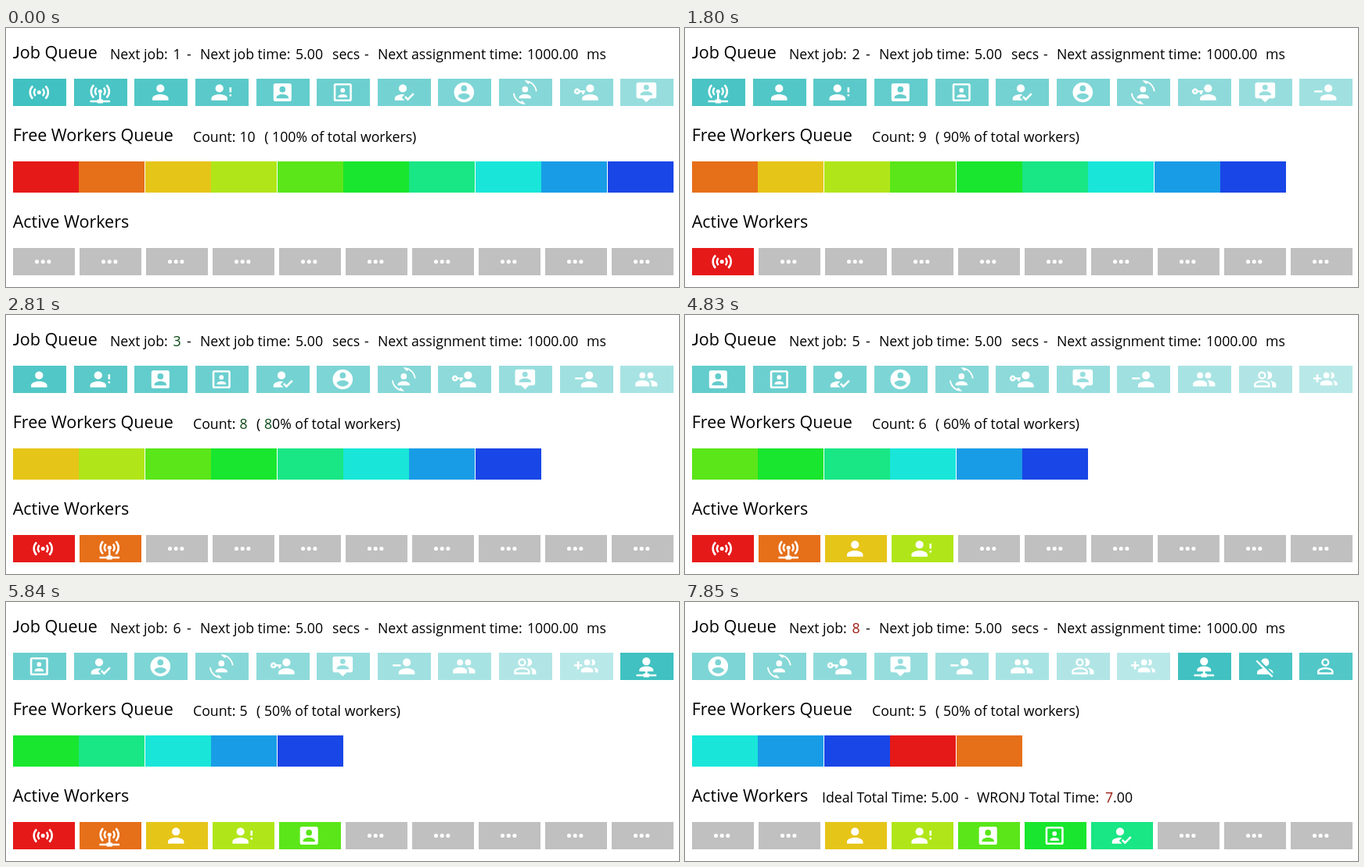
Recreate the animation shown at these times as an HTML page with a canvas. Size 860 px wide and 332 px high, loop 8000 ms.

```html
<!DOCTYPE html>
<html lang="en">
<head>
<meta charset="utf-8">
<title>Job queue</title>
<style>
html, body { margin: 0; width: 100%; height: 100%; overflow: hidden; background: #fff; }
canvas { display: block; width: 860px; height: 332px; }
</style>
</head>
<body>
<canvas id="stage" width="860" height="332"></canvas>
<script>
const ctx = document.getElementById('stage').getContext('2d');
const LOOP = 8000;
const STEPS = [1800, 2810, 3820, 4830, 5840, 6840, 7850];
const JOB_SECS = 5;
const WORKERS = 10;
const TINTS = { 2: '#0b4a16', 7: '#9c1c10' };

// Path pieces on a 24-unit grid
const disc = (x, y, r) =>
  `M${x - r},${y}a${r},${r} 0 1 1 ${2 * r},0a${r},${r} 0 1 1 ${-2 * r},0z`;
const rect = (x, y, w, h) => `M${x},${y}h${w}v${h}h${-w}z`;
const bust = (x, y, w, h, d = h * 2 / 3) =>
  `M${x},${y}c${w * .55},0 ${w},${d * .45} ${w},${d}V${y + h}H${x - w}V${y + d}` +
  `c0,${-d * .55} ${w * .45},${-d} ${w},${-d}z`;
const box = (x, y, w, h, r) =>
  `M${x + r},${y}h${w - 2 * r}a${r},${r} 0 0 1 ${r},${r}v${h - 2 * r}a${r},${r} 0 0 1 ${-r},${r}` +
  `h${2 * r - w}a${r},${r} 0 0 1 ${-r},${-r}v${2 * r - h}a${r},${r} 0 0 1 ${r},${-r}z`;
const person = x => disc(x, 8, 4) + bust(x, 14, 8, 6, 4);
const outline = x =>
  disc(x, 8, 4) + disc(x, 8, 2.1) + bust(x, 13, 8, 7, 4) + bust(x, 14.9, 6.1, 3.2, 2.1);
const badge = y => disc(12, y, 3) + bust(12, y + 4.9, 6, 4.1, 3.1);

function wave(y, r, side) {
  const k = Math.SQRT1_2, a = (r + 1) * k, b = (r - 1) * k, out = side > 0 ? 1 : 0;
  return `M${12 + side * a},${y - a}A${r + 1},${r + 1} 0 0 ${out} ${12 + side * a},${y + a}` +
    `L${12 + side * b},${y + b}A${r - 1},${r - 1} 0 0 ${1 - out} ${12 + side * b},${y - b}z`;
}
const radio = y =>
  disc(12, y, 2) + [5, 9].map(r => wave(y, r, -1) + wave(y, r, 1)).join('');
const network = y =>
  `M11,${y}H13V19H14A1,1 0 0 1 15,20H22V22H15A1,1 0 0 1 14,23H10A1,1 0 0 1 9,22H2V20H9A1,1 0 0 1 10,19H11z`;

const ICONS = [
  radio(12),
  radio(11) + network(12.8),
  person(12),
  person(10) + rect(20, 7, 2, 5) + rect(20, 14, 2, 2),
  box(3, 3, 18, 18, 2) + badge(9),
  box(3, 3, 18, 18, 2) + rect(5, 5, 14, 14) + disc(12, 10, 2.25) + bust(12, 14, 4.5, 3, 2.25),
  disc(11, 8, 4) + 'M10,17L13,20H3V18C3,15.8 6.6,14 11,14L12.9,14.1z' +
    'M21.1,12.5L22.5,13.9L16,20.5L12.5,17L13.9,15.6L16,17.7z',
  disc(12, 12, 10) + disc(12, 8, 3) +
    'M12,19.2C9.5,19.2 7.3,17.9 6,16C6,14 10,12.9 12,12.9C14,12.9 18,14 18,16C16.7,17.9 14.5,19.2 12,19.2z',
  badge(9) + 'M7.5,21.5C4.2,19.9 1.9,16.8 1.5,13H0C.6,19.2 5.7,24 12,24H12.7L8.8,20.2z' +
    'M16.5,2.5C19.8,4.1 22.1,7.2 22.5,11H24C23.4,4.8 18.3,0 12,0H11.3L15.2,3.8z',
  person(16) + 'M11,10V12H10V14H8V12H5.8A3,3 0 1 1 5.8,10z' + disc(3, 11, 1),
  box(2, 2, 20, 16, 2) + 'M8,18H16L12,22z' + disc(12, 7, 2.7) + bust(12, 11, 6, 4, 3.1),
  person(15) + rect(1, 10, 8, 2),
  disc(8, 8, 3) + disc(16, 8, 3) + bust(8, 13, 7, 6, 3.5) +
    'M16,13L15,13.1C16.2,13.9 17,15 17,16.5V19H23V16.5C23,14.2 18.3,13 16,13z',
  outline(9) + 'M15,12A4,4 0 0 0 15,4L13.7,4.2A6,6 0 0 1 13.7,11.8z' +
    'M16.7,13.1C18,14.1 19,15.3 19,17V20H23V17C23,14.8 19.4,13.5 16.7,13.1z',
  disc(13, 8, 3) + bust(13, 13, 6, 5, 3) + 'M8,10H5V7H3V10H0V12H3V15H5V12H8z' +
    'M18,11A3,3 0 0 0 18,5L17.1,5.1A5,5 0 0 1 17.1,10.9z' +
    'M19.6,13.2Q21,14.4 21,16V18H24V16C24,14.5 21.6,13.5 19.6,13.2z',
  disc(12, 7, 4) + bust(12, 12, 7, 5, 3.5) + network(17),
  'M12,4A4,4 0 0 1 12.8,11.9L8.1,7.2A4,4 0 0 1 12,4z' +
    'M12.3,14L20,21.7L18.7,23L15.7,20H4V18C4,16.2 6.5,14.6 9.9,14.1L2.8,7L4,5.8z' +
    'M20,18V19.2L15.1,14.3C18,14.9 20,16.3 20,18z',
  outline(12)
].map(d => new Path2D(d));
const IDLE = new Path2D([6, 12, 18].map(x => disc(x, 12, 2)).join(''));

const jobColor = i => {
  const k = i % 15;
  return `rgb(${65 + 8.6 * k}, ${193 + 2.8 * k}, ${193 + 2.8 * k})`;
};
const workerColor = w => `hsl(${25.2 * w}, 80%, 50%)`;

function tile(x, y, w, h, color) {
  ctx.fillStyle = color;
  ctx.fillRect(Math.round(x), y, w, h);
}

function icon(path, x, y) {
  ctx.save();
  ctx.translate(x, y);
  ctx.scale(1.28, 1.28);
  ctx.translate(-12, -12);
  ctx.fillStyle = '#fff';
  ctx.fill(path, 'evenodd');
  ctx.restore();
}

// Capital J comes from Lato, where it stays on the baseline
function text(str, x, y, size = 17.7, color = '#000') {
  ctx.fillStyle = color;
  for (const part of String(str).split(/(J)/)) {
    ctx.font = `${size}px ${part === 'J' ? 'Lato' : '"Open Sans", "Noto Sans"'}, sans-serif`;
    ctx.fillText(part, x, y);
    x += ctx.measureText(part).width;
  }
  return x;
}
const title = (str, y) => text(str, 8.7, y, 21.5);

function drawJobs(n, tint) {
  title('Job Queue', 39);
  const parts = [['Next job:', 133], ['-', 231], ['Next job time:', 248], [JOB_SECS.toFixed(2), 370],
    ['secs', 417], ['-', 458], ['Next assignment time:', 475], ['1000.00', 666], ['ms', 742]];
  for (const [str, x] of parts) text(str, x, 40);
  text(n + 1, 213.5, 40, 17.7, tint);
  for (let i = 0; i < 11; i++) {
    const x = Math.round(9.2 + 77.6 * i);
    tile(x, 65, 68, 35, jobColor(n + i));
    icon(ICONS[n + i], x + 33.3, 82.5);
  }
}

function drawFree(n) {
  const count = WORKERS - Math.min(n, JOB_SECS);
  const tint = n === 2 ? TINTS[n] : '#000';
  title('Free Workers Queue', 145);
  text('Count:', 239, 146);
  let x = text(count, 298.5, 146, 17.7, tint);
  x = text('( ', x + 11.5, 146);
  x = text(count, x, 146, 17.7, tint);
  text('0% of total workers)', x, 146);
  for (let i = 0; i < count; i++)
    tile(9 + 84.4 * i, 171, 84, 40, workerColor((n + i) % WORKERS));
}

function drawActive(n, tint) {
  title('Active Workers', 256);
  if (n > JOB_SECS) {
    const parts = [['Ideal Total Time:', 175], ['5.00', 314.5], ['-', 357], ['WRONJ Total Time:', 373]];
    for (const [str, x] of parts) text(str, x, 257);
    text('.00', text(n, 537, 257, 17.7, tint), 257);
  }
  for (let w = 0; w < WORKERS; w++) {
    const x = 9 + 85 * w, busy = n > w && n - w <= JOB_SECS;
    tile(x, 282, 79, 35, busy ? workerColor(w) : '#c0c0c0');
    icon(busy ? ICONS[w] : IDLE, x + 38.2, 299.5);
  }
}

function draw() {
  const t = performance.now() % LOOP;
  const n = STEPS.filter(at => t >= at).length;
  const tint = TINTS[n] || '#000';
  ctx.fillStyle = '#fff';
  ctx.fillRect(0, 0, 860, 332);
  drawJobs(n, tint);
  drawFree(n);
  drawActive(n, tint);
  requestAnimationFrame(draw);
}
draw();
</script>
</body>
</html>
```
